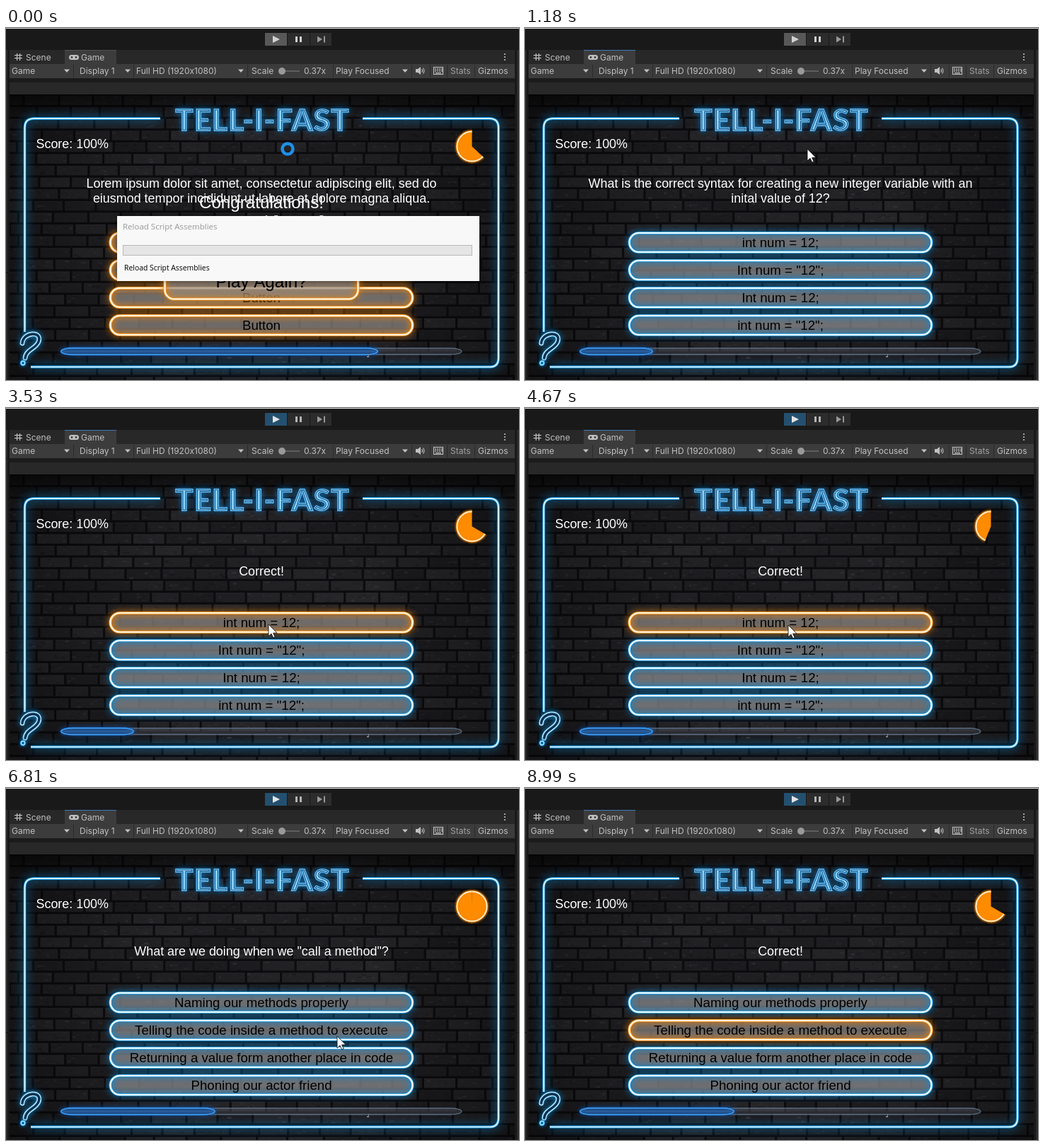
An HTML page with a canvas for the animation above (9010 ms loop, 725 by 498 pixels).

```html
<!DOCTYPE html>
<html lang="en">
<head>
<meta charset="utf-8">
<title>Quiz game preview</title>
<style>
html, body { margin: 0; width: 100%; height: 100%; overflow: hidden; background: #191919; }
canvas { display: block; }
</style>
</head>
<body>
<canvas id="stage" width="725" height="498"></canvas>
<script>
const W = 725, H = 498, LOOP = 9010;
const UI = 'Inter, sans-serif';
const GAME = '"Liberation Sans", Arial, sans-serif';
const DIALOG = '"Open Sans", sans-serif';
const BLUE = '#078ad6', ORANGE = '#f58500';
const BUTTON_Y = [303.5, 342.5, 381.5, 420.5];

// Update bursts: start, end, number of steps.
const BURSTS = [
  [560, 800, 3], [1180, 2200, 8], [2350, 3380, 8], [3530, 4540, 8],
  [4670, 5670, 8], [5800, 6810, 8], [6960, 7940, 8], [8090, 8990, 7]
];
const STEPS = [0];
for (const [a, b, n] of BURSTS)
  for (let i = 0; i < n; i++) STEPS.push(Math.round(a + (b - a) * i / (n - 1)));

const START = 1180, PLAY = 1320, ANSWER_1 = 1860, NEXT = 6790, ANSWER_2 = 7320;
const SHOW_TIME = 5000, QUESTION_TIME = 10000;

// Pointer path: time, x, y.
const POINTER = [
  [1250, 399, 171], [1750, 386, 300], [2350, 381, 304], [2900, 363, 305],
  [3300, 371, 306], [4640, 371, 306], [5500, 614, 466], [5780, 614, 466],
  [6600, 468, 351], [7380, 470, 349], [7700, 630, 440], [7860, 706, 484], [7940, 765, 530]
];

const QUIZ = [
  { text: ['What is the correct syntax for creating a new integer variable with an', 'inital value of 12?'],
    options: ['int num = 12;', 'Int num = "12";', 'Int num = 12;', 'int num = "12";'], right: 0, bar: 180 },
  { text: ['What are we doing when we "call a method"?'],
    options: ['Naming our methods properly', 'Telling the code inside a method to execute',
      'Returning a value form another place in code', 'Phoning our actor friend'], right: 1, bar: 295 }
];

let seed = 11;
const rnd = () => (seed = (seed * 16807) % 2147483647) / 2147483647;

function layer(draw) {
  const c = document.createElement('canvas');
  c.width = W; c.height = H;
  draw(c.getContext('2d'));
  return c;
}

function rect(g, x, y, w, h, color) {
  g.fillStyle = color;
  g.fillRect(x, y, w, h);
}

function label(g, text, x, y, font, color, align = 'left') {
  g.font = font;
  g.fillStyle = color;
  g.textAlign = align;
  g.textBaseline = 'alphabetic';
  g.fillText(text, x, y);
}

function poly(g, points, color) {
  g.beginPath();
  points.forEach(([x, y]) => g.lineTo(x, y));
  g.closePath();
  g.fillStyle = color;
  g.fill();
}

function disc(g, x, y, r, color) {
  g.beginPath();
  g.arc(x, y, r, 0, 7);
  g.fillStyle = color;
  g.fill();
}

function pill(x, y, w, h, r) {
  const p = new Path2D();
  p.roundRect(x, y, w, h, r);
  return p;
}

function neon(g, path, color, core, width, blur) {
  g.save();
  g.shadowColor = g.strokeStyle = color;
  g.shadowBlur = blur;
  g.lineWidth = width + 1.6;
  g.stroke(path);
  g.shadowBlur = 0;
  g.strokeStyle = core;
  g.lineWidth = width;
  g.stroke(path);
  g.restore();
}

function bricks(g) {
  rect(g, 5, 94, 714, 404, '#0c0b0d');
  g.save();
  g.beginPath();
  g.rect(5, 94, 714, 404);
  g.clip();
  for (let row = 0; row < 25; row++) {
    const y = 94 + row * 16.6;
    let x = -20 - (row % 2) * 24 - rnd() * 6;
    while (x < W) {
      const w = 40 + rnd() * 12, s = 27 + Math.floor(rnd() * 12);
      rect(g, x + 1, y + 1.5, w - 3, 13.4, `rgb(${s},${s - 1},${s + 2})`);
      rect(g, x + 1, y + 1.5, w - 3, 1, `rgba(90,88,96,${0.05 + rnd() * 0.15})`);
      for (let k = 0; k < 10; k++) {
        const tone = rnd() < 0.6 ? '0,0,0' : '100,98,106';
        rect(g, x + rnd() * (w - 6), y + 2 + rnd() * 11, 1 + rnd() * 6, 1 + rnd() * 2, `rgba(${tone},${rnd() * 0.2})`);
      }
      x += w;
    }
  }
  const v = g.createRadialGradient(362, 310, 160, 362, 300, 440);
  v.addColorStop(0, 'rgba(0,0,0,0)');
  v.addColorStop(1, 'rgba(0,0,0,.45)');
  rect(g, 5, 94, 714, 404, v);
  const top = g.createLinearGradient(0, 94, 0, 130);
  top.addColorStop(0, 'rgba(0,0,0,.6)');
  top.addColorStop(1, 'rgba(0,0,0,0)');
  rect(g, 5, 94, 714, 36, top);
  g.restore();
}

function border(g) {
  const p = new Path2D();
  p.moveTo(218, 128);
  p.lineTo(40, 128);
  p.quadraticCurveTo(26.5, 128, 26.5, 141);
  p.lineTo(26.5, 430);
  p.moveTo(35, 479.5);
  p.lineTo(684, 479.5);
  p.quadraticCurveTo(696, 479.5, 696, 467);
  p.lineTo(696, 141);
  p.quadraticCurveTo(696, 128, 683, 128);
  p.lineTo(504, 128);
  neon(g, p, BLUE, '#d6f3ff', 2.2, 14);

  const q = new Path2D();
  q.moveTo(23, 446);
  q.bezierCurveTo(24, 430, 52, 428, 46, 444);
  q.bezierCurveTo(42, 454, 28, 455, 27, 467);
  g.save();
  g.lineCap = 'round';
  g.shadowColor = BLUE;
  g.shadowBlur = 8;
  g.strokeStyle = '#a8e2ff';
  g.lineWidth = 6.8;
  g.stroke(q);
  g.shadowBlur = 0;
  g.strokeStyle = '#0b3150';
  g.lineWidth = 3.4;
  g.stroke(q);
  g.restore();
  const dot = new Path2D();
  dot.arc(24, 474, 2.7, 0, 7);
  neon(g, dot, BLUE, '#a8e2ff', 1.4, 5);
}

function title(g) {
  const art = layer(c => {
    label(c, 'TELL-I-FAST', 362, 146, '900 44px Lato, sans-serif', '#8fd6ff', 'center');
    c.globalCompositeOperation = 'source-atop';
    for (const [w, color] of [[4.6, '#0c4270'], [2.8, '#62bdf5']]) {
      c.lineWidth = w;
      c.strokeStyle = color;
      c.strokeText('TELL-I-FAST', 362, 146);
    }
  });
  g.save();
  g.shadowColor = '#0870b8';
  g.shadowBlur = 8;
  g.drawImage(art, 0, 0);
  g.restore();
}

function toolbar(g) {
  rect(g, 0, 0, W, H, '#191919');
  rect(g, 0, 0, W, 1, '#d8d8d8');
  rect(g, 0, 31, 2, 467, '#2b2b2b');
  rect(g, 722, 31, 3, 467, '#2b2b2b');
  rect(g, 0, 71, 2, 1, '#151515');
  rect(g, 0, 345, 2, 2, '#151515');
  rect(g, 722, 346, 3, 1, '#151515');
  rect(g, 5, 31, 714, 20, '#282828');
  rect(g, 83, 31, 73, 20, '#3c3c3c');
  rect(g, 5, 51, 714, 20, '#3c3c3c');
  rect(g, 5, 71, 714, 6, '#1b1b1b');
  rect(g, 5, 77, 714, 17, '#282828');

  const ink = '#c0c0c0', font = '12px ' + UI;
  for (const [text, x, y] of [['Scene', 28, 46], ['Game', 106, 46], ['Game', 8, 65], ['Display 1', 104, 65],
    ['Full HD (1920x1080)', 184, 65], ['Scale', 347, 65], ['0.37x', 421, 65], ['Play Focused', 466, 65], ['Gizmos', 667, 65]])
    label(g, text, x, y, font, ink);
  label(g, 'Stats', 628, 65, font, '#a0a0a0');
  for (const x of [95, 180, 341, 462, 573, 599, 623, 662]) rect(g, x, 52, 1, 18, '#2a2a2a');
  for (const x of [86, 172, 332, 564]) poly(g, [[x - 4, 58.5], [x + 4, 58.5], [x, 63]], ink);
  for (const y of [37, 41, 45]) disc(g, 705, y, 1.1, ink);

  for (const k of [15, 19]) {
    rect(g, k, 36, 1.2, 10, ink);
    rect(g, 12, k + 23, 11, 1.2, ink);
  }
  g.fillStyle = ink;
  g.fill(pill(89, 38, 14, 7, 3.5));
  disc(g, 93, 41.5, 1.4, '#3c3c3c');
  disc(g, 99, 41.5, 1.4, '#3c3c3c');

  rect(g, 386, 60, 29, 2, '#5e5e5e');
  disc(g, 390, 61, 5, '#999');

  poly(g, [[579, 58], [582, 58], [586, 55], [586, 66], [582, 63], [579, 63]], ink);
  g.strokeStyle = ink;
  g.lineWidth = 1.1;
  for (const r of [3, 5.5]) {
    g.beginPath();
    g.arc(585.5, 60.5, r, -0.8, 0.8);
    g.stroke();
  }
  g.strokeRect(604.5, 55.5, 13, 10);
  for (let i = 0; i < 4; i++)
    for (const y of [57.5, 60]) rect(g, 606 + i * 3, y, 2, 1.4, ink);
  rect(g, 607, 63, 8, 1.3, ink);
}

const backdrop = layer(g => {
  toolbar(g);
  bricks(g);
  border(g);
  title(g);
  label(g, 'Score: 100%', 42.5, 169.5, '17.9px ' + GAME, '#fff');
});

function playControls(g, playing) {
  rect(g, 366, 7, 31, 18, playing ? '#24506f' : '#585858');
  rect(g, 398, 7, 31, 18, '#2c2c2c');
  rect(g, 430, 7, 30, 18, '#2c2c2c');
  poly(g, [[377, 11], [387, 16], [377, 21]], playing ? '#e4e4e4' : '#d2d2d2');
  const pause = playing ? '#b4b4b4' : '#d2d2d2';
  rect(g, 409, 12, 3, 8, pause);
  rect(g, 415, 12, 3, 8, pause);
  poly(g, [[440, 11.5], [447, 16], [440, 20.5]], '#989898');
  rect(g, 449, 11.5, 2, 9, '#989898');
}

function panel(g, x, y, w, h, r, color) {
  const warm = color === ORANGE, p = pill(x, y, w, h, r);
  g.save();
  g.fillStyle = warm ? 'rgba(145,138,134,.7)' : 'rgba(142,142,144,.72)';
  g.fill(p);
  g.clip(p);
  g.shadowColor = g.strokeStyle = color;
  g.shadowBlur = 9;
  g.globalAlpha = 0.35;
  g.lineWidth = 3;
  g.stroke(p);
  g.restore();
  neon(g, p, color, warm ? '#fff1dc' : '#ecfaff', 2.6, 10);
}

function option(g, text, i, color) {
  panel(g, 147.5, BUTTON_Y[i] - 13.5, 427, 27, 13.5, color);
  label(g, text, 361, BUTTON_Y[i] + 6.5, '18.67px ' + GAME, '#000', 'center');
}

function question(g, lines) {
  lines.forEach((text, i) => {
    const y = 236.5 + (i - (lines.length - 1) / 2) * 20.6;
    label(g, text, 361, y, '17.93px ' + GAME, '#fff', 'center');
  });
}

function capsule(x1, x2) {
  const p = new Path2D();
  p.moveTo(x1 + 16, 453);
  p.lineTo(x2 - 16, 453);
  p.ellipse(x2 - 16, 457.5, 16, 4.5, 0, -Math.PI / 2, Math.PI / 2);
  p.lineTo(x1 + 16, 462);
  p.ellipse(x1 + 16, 457.5, 16, 4.5, 0, Math.PI / 2, Math.PI * 1.5);
  return p;
}

function progress(g, end) {
  const track = capsule(78, 644), fill = capsule(78, end);
  g.fillStyle = 'rgba(80,84,95,.45)';
  g.fill(track);
  g.strokeStyle = 'rgba(120,150,180,.6)';
  g.lineWidth = 1.3;
  g.stroke(track);
  neon(g, fill, '#1058b0', '#3f9cf0', 1.3, 7);
  const c = g.createLinearGradient(0, 453, 0, 462);
  c.addColorStop(0, '#163f78');
  c.addColorStop(0.5, '#2a5f9c');
  c.addColorStop(1, '#163f78');
  g.fillStyle = c;
  g.fill(fill);
  g.strokeStyle = '#3f9cf0';
  g.stroke(fill);
  rect(g, 510, 464, 3, 2, '#7b838c');
  rect(g, 512, 461, 1, 4, '#7b838c');
}

function timer(g, part) {
  const x = 658.5, y = 167.5, from = -Math.PI / 2 + (1 - part) * Math.PI * 2;
  g.save();
  g.beginPath();
  g.moveTo(x, y);
  g.arc(x, y, 25, from, Math.PI * 1.5);
  g.closePath();
  g.clip();
  disc(g, x, y, 21, '#ff8c00');
  const ring = new Path2D();
  ring.arc(x, y, 21, 0, 7);
  neon(g, ring, ORANGE, '#ffedcc', 1.8, 4);
  g.restore();
}

function placeholder(g) {
  question(g, ['Lorem ipsum dolor sit amet, consectetur adipiscing elit, sed do',
    'eiusmod tempor incididunt ut labore et dolore magna aliqua.']);
  BUTTON_Y.forEach((y, i) => option(g, 'Button', i, ORANGE));
  progress(g, 525);
  timer(g, 0.63);
  const font = '24.2px ' + GAME;
  label(g, 'Congratulations!', 361, 254.5, font, '#fff', 'center');
  label(g, 'You scored [score]%', 361, 282.5, font, '#fff', 'center');
  panel(g, 224.5, 332.5, 273, 51, 13, ORANGE);
  label(g, 'Play Again?', 361, 367, font, '#000', 'center');
}

function dialogBox(heading, message) {
  return layer(g => {
    g.shadowColor = 'rgba(0,0,0,.5)';
    g.shadowBlur = 7;
    rect(g, 157, 266, 512, 92, '#f8f8f8');
    g.shadowBlur = 0;
    rect(g, 165, 307, 494, 15, '#b9b9b9');
    rect(g, 166, 308, 492, 13, '#e5e5e5');
    label(g, heading, 165, 285, '11.5px ' + DIALOG, '#999');
    label(g, message, 167, 343, '10.4px ' + DIALOG, '#000');
  });
}
const reloadBox = dialogBox('Reload Script Assemblies', 'Reload Script Assemblies');
const importBox = dialogBox('Hold on...', 'Importing assets');

function dialog(g, t) {
  if (t >= 800) return;
  g.save();
  if (t >= 680) {
    g.globalAlpha = 0.35;
    g.translate(413, 312);
    g.scale(0.975, 0.975);
    g.translate(-413, -312);
  }
  g.drawImage(t < 560 ? reloadBox : importBox, 0, 0);
  g.restore();
}

function pointer(g, t) {
  if (t < 680) {
    g.beginPath();
    g.arc(398, 171, 7.5, 0, 7);
    g.lineWidth = 4.5;
    g.strokeStyle = '#1e8fe6';
    g.stroke();
    return;
  }
  let [, x, y] = POINTER[0];
  for (let i = 1; i < POINTER.length; i++) {
    const [t0, x0, y0] = POINTER[i - 1], [t1, x1, y1] = POINTER[i];
    if (t < t0) break;
    const k = Math.min(1, (t - t0) / (t1 - t0)), e = k * k * (3 - 2 * k);
    x = x0 + (x1 - x0) * e;
    y = y0 + (y1 - y0) * e;
  }
  g.save();
  g.translate(Math.round(x), Math.round(y));
  poly(g, [[0, 0], [0, 17], [4, 13.3], [6.7, 19], [9.2, 18], [6.6, 12.3], [12, 12.3]], '#fff');
  g.strokeStyle = '#000';
  g.lineWidth = 0.8;
  g.stroke();
  g.restore();
}

function game(g, t) {
  const second = t >= NEXT, quiz = QUIZ[second ? 1 : 0];
  const asked = second ? NEXT : PLAY, answered = second ? ANSWER_2 : ANSWER_1;
  const done = t >= answered;
  question(g, done ? ['Correct!'] : quiz.text);
  quiz.options.forEach((text, i) => option(g, text, i, done && i === quiz.right ? ORANGE : BLUE));
  progress(g, quiz.bar);
  if (t >= PLAY) timer(g, done ? 1 - (t - answered) / SHOW_TIME : 1 - (t - asked) / QUESTION_TIME);
}

const ctx = document.getElementById('stage').getContext('2d');

function render(t) {
  ctx.drawImage(backdrop, 0, 0);
  rect(ctx, 83, 31, 73, 1, t < START ? '#505050' : '#3a79bb');
  playControls(ctx, t >= PLAY);
  if (t < START) placeholder(ctx);
  else game(ctx, t);
  dialog(ctx, t);
  pointer(ctx, t);
}

const begin = performance.now();
let shown = -1;
function tick() {
  const t = (performance.now() - begin) % LOOP;
  const step = STEPS.filter(s => s <= t).pop();
  if (step !== shown) render(shown = step);
  requestAnimationFrame(tick);
}
tick();
</script>
</body>
</html>
```
